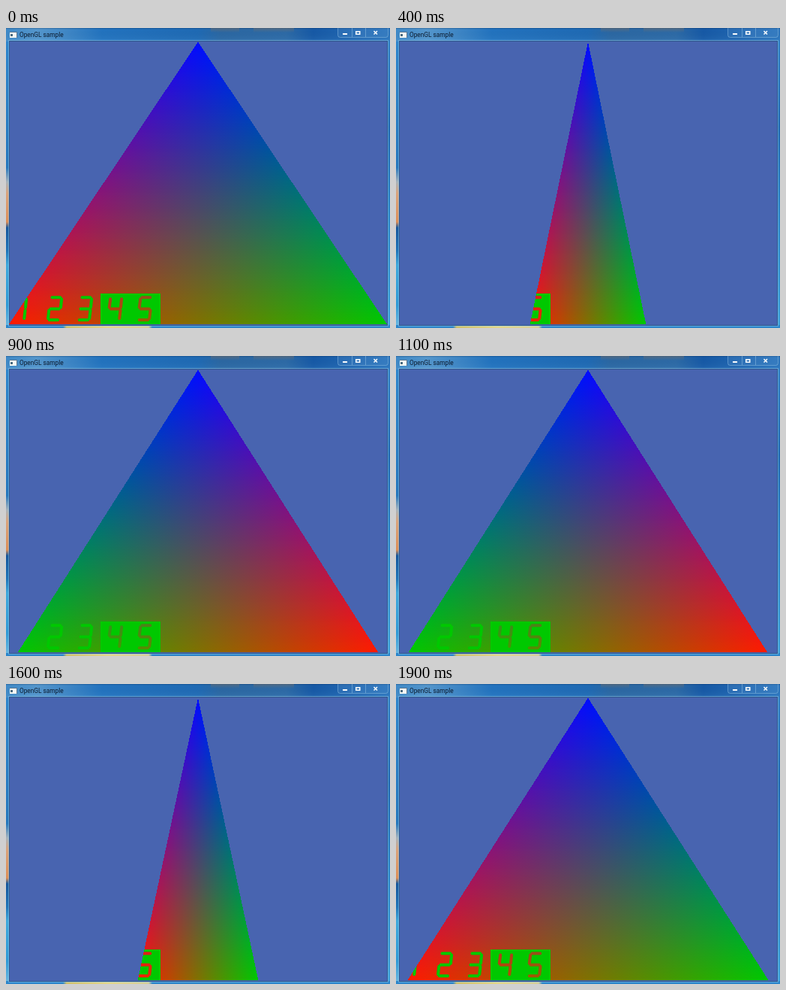
An HTML page with a canvas for the animation above (2000 ms loop, 512 px wide and 400 px high).

```html
<!DOCTYPE html>
<html lang="en">
<head>
<meta charset="utf-8">
<title>OpenGL sample</title>
<style>
  html, body { margin: 0; width: 100%; height: 100%; overflow: hidden; background: #4864b0; }
  canvas { display: block; }
</style>
</head>
<body>
<canvas id="stage" width="512" height="400"></canvas>
<script>
const W = 512, H = 400;
const LOOP = 2000, STEP = 100, DEGREES_PER_STEP = 18.037;
const APEX = { x: 256, y: 18.5 }, BASE_Y = 395, HALF_WIDTH = 252;
const RED = [255, 26, 0], GREEN = [0, 200, 0], BLUE = [0, 12, 255];

const ctx = document.getElementById('stage').getContext('2d');
const css = c => `rgb(${c.map(Math.round).join(',')})`;
const mix = (a, b, t) => a.map((v, i) => v + (b[i] - v) * t);

function layer(draw) {
  const canvas = document.createElement('canvas');
  canvas.width = W;
  canvas.height = H;
  draw(canvas.getContext('2d'));
  return canvas;
}

function rect(g, color, x, y, w, h) {
  g.fillStyle = color;
  g.fillRect(x, y, w, h);
}

function ramp(g, x0, y0, x1, y1, stops) {
  const gradient = g.createLinearGradient(x0, y0, x1, y1);
  stops.forEach(([at, color]) => gradient.addColorStop(at, color));
  return gradient;
}

function frame(g, color, x, y, w, h) {
  g.strokeStyle = color;
  g.lineWidth = 1;
  g.strokeRect(x + .5, y + .5, w - 1, h - 1);
}

const windowLayer = layer(g => {
  // Glass title bar
  rect(g, ramp(g, 0, 0, W, 0, [
    [0, '#3f8ac8'], [.08, '#5597cd'], [.16, '#3f87c6'], [.25, '#2273bf'], [.5, '#1f6ab4'],
    [.56, '#2b67a2'], [.73, '#2d6aa6'], [.8, '#1659a6'], [1, '#2a74bd']
  ]), 0, 0, W, 18);
  rect(g, ramp(g, 0, 0, 0, 18, [
    [0, 'rgba(10,40,80,.3)'], [.12, 'rgba(10,40,80,0)'], [1, 'rgba(120,190,240,.12)']
  ]), 0, 0, W, 18);
  const smudge = ramp(g, 0, 0, 0, 6, [[0, 'rgba(105,110,115,.6)'], [1, 'rgba(105,110,115,0)']]);
  rect(g, smudge, 273, 0, 38, 6);
  rect(g, smudge, 330, 0, 54, 6);

  // Side and bottom borders
  rect(g, ramp(g, 0, 18, 0, H, [
    [0, '#2f86cc'], [.44, '#2678bd'], [.49, '#a8b4bc'], [.53, '#d9a47c'],
    [.63, '#dc8f58'], [.65, '#17589c'], [.73, '#1f74b8'], [.78, '#3fa9dc'],
    [.92, '#2f9ad6'], [1, '#6fbbe2']
  ]), 0, 18, 4, H - 18);
  rect(g, ramp(g, 0, 18, 0, H, [[0, '#2f7fc4'], [.3, '#1f69b2'], [.6, '#2a86c8'], [1, '#3aa0d8']]), 508, 18, 4, H - 18);
  rect(g, '#2b86cb', 0, 396, W, 4);
  rect(g, ramp(g, 76, 0, 195, 0, [
    [0, '#2b86cb'], [.04, '#d0c068'], [.5, '#e4d789'], [.96, '#d6cf9a'], [1, '#2b86cb']
  ]), 76, 397, 119, 3);
  frame(g, 'rgba(150,205,240,.5)', 3, 16, 507, 382);
  frame(g, '#2f568c', 4, 17, 505, 380);
  rect(g, '#4864b0', 5, 18, 503, 378);

  // Window icon and caption
  rect(g, '#5b7690', 5, 5, 10, 8);
  rect(g, '#f4f8f4', 5, 6, 9, 7);
  rect(g, '#4a6a80', 6, 8, 3, 3);
  g.fillStyle = '#0c1c30';
  g.font = '8.3px Roboto, "Noto Sans", sans-serif';
  g.fillText('OpenGL sample', 18, 12);

  // Caption buttons
  rect(g, 'rgba(120,175,220,.15)', 443, 0, 66, 12);
  g.strokeStyle = 'rgba(150,195,230,.5)';
  g.beginPath();
  g.roundRect(442.5, -2.5, 67, 15, 3);
  g.moveTo(461.5, 0); g.lineTo(461.5, 12);
  g.moveTo(479.5, 0); g.lineTo(479.5, 12);
  g.stroke();
  rect(g, '#fff', 449, 7, 6, 2);
  g.strokeStyle = '#fff';
  g.lineWidth = 1.5;
  g.strokeRect(466.75, 4.75, 5, 3.5);
  g.beginPath();
  g.moveTo(490.5, 4); g.lineTo(495, 8.5);
  g.moveTo(495, 4); g.lineTo(490.5, 8.5);
  g.stroke();
});

// Slanted seven-segment digits; each segment joins two corners of the cell.
const CORNERS = {
  A: [13.5, 359.3], B: [28.3, 359.3], C: [11.5, 374.5], D: [26.8, 374.5], E: [9.8, 389.3], F: [25, 389.3]
};
const DIGITS = ['BD DF', 'AB BD CD CE EF', 'AB BD CD DF EF', 'AC CD BD DF', 'AB AC CD DF EF'];
const CELL = 40, CELLS_LEFT = 6;

function drawDigit(g, index) {
  const left = CELLS_LEFT + index * CELL - (index === 0 ? 7 : 0);
  g.lineWidth = 4;
  g.lineCap = 'round';
  g.beginPath();
  for (const [from, to] of DIGITS[index].split(' ')) {
    const [x0, y0] = CORNERS[from], [x1, y1] = CORNERS[to];
    const inset = 2 / Math.hypot(x1 - x0, y1 - y0);
    const dx = (x1 - x0) * inset, dy = (y1 - y0) * inset;
    g.moveTo(left + x0 + dx, y0 + dy);
    g.lineTo(left + x1 - dx, y1 - dy);
  }
  g.stroke();
}

const digitLayer = layer(g => {
  g.strokeStyle = css(GREEN);
  [0, 1, 2].forEach(i => drawDigit(g, i));
  rect(g, css(GREEN), 126, 354, 80, 41);
  g.globalCompositeOperation = 'destination-out';
  [3, 4].forEach(i => drawDigit(g, i));
});

function drawTriangle(angle) {
  const spread = Math.cos(angle) * HALF_WIDTH;
  const [leftColor, rightColor] = spread > 0 ? [RED, GREEN] : [GREEN, RED];
  for (let y = Math.ceil(APEX.y); y < BASE_Y; y++) {
    const t = (y + .5 - APEX.y) / (BASE_Y - APEX.y);
    const half = Math.abs(spread) * t;
    const left = Math.round(APEX.x - half), right = Math.round(APEX.x + half);
    if (right <= left) continue;
    const fill = ramp(ctx, APEX.x - half, 0, APEX.x + half, 0, [
      [0, css(mix(BLUE, leftColor, t))], [1, css(mix(BLUE, rightColor, t))]
    ]);
    rect(ctx, fill, left, y, right - left, 1);
    // The digits show only where the triangle covers them.
    if (y >= 354) ctx.drawImage(digitLayer, left, y, right - left, 1, left, y, right - left, 1);
  }
}

function render(time) {
  const step = Math.floor((time % LOOP) / STEP);
  ctx.drawImage(windowLayer, 0, 0);
  drawTriangle(step * DEGREES_PER_STEP * Math.PI / 180);
}

const start = performance.now();
function tick() {
  render(performance.now() - start);
  requestAnimationFrame(tick);
}
tick();
</script>
</body>
</html>
```
